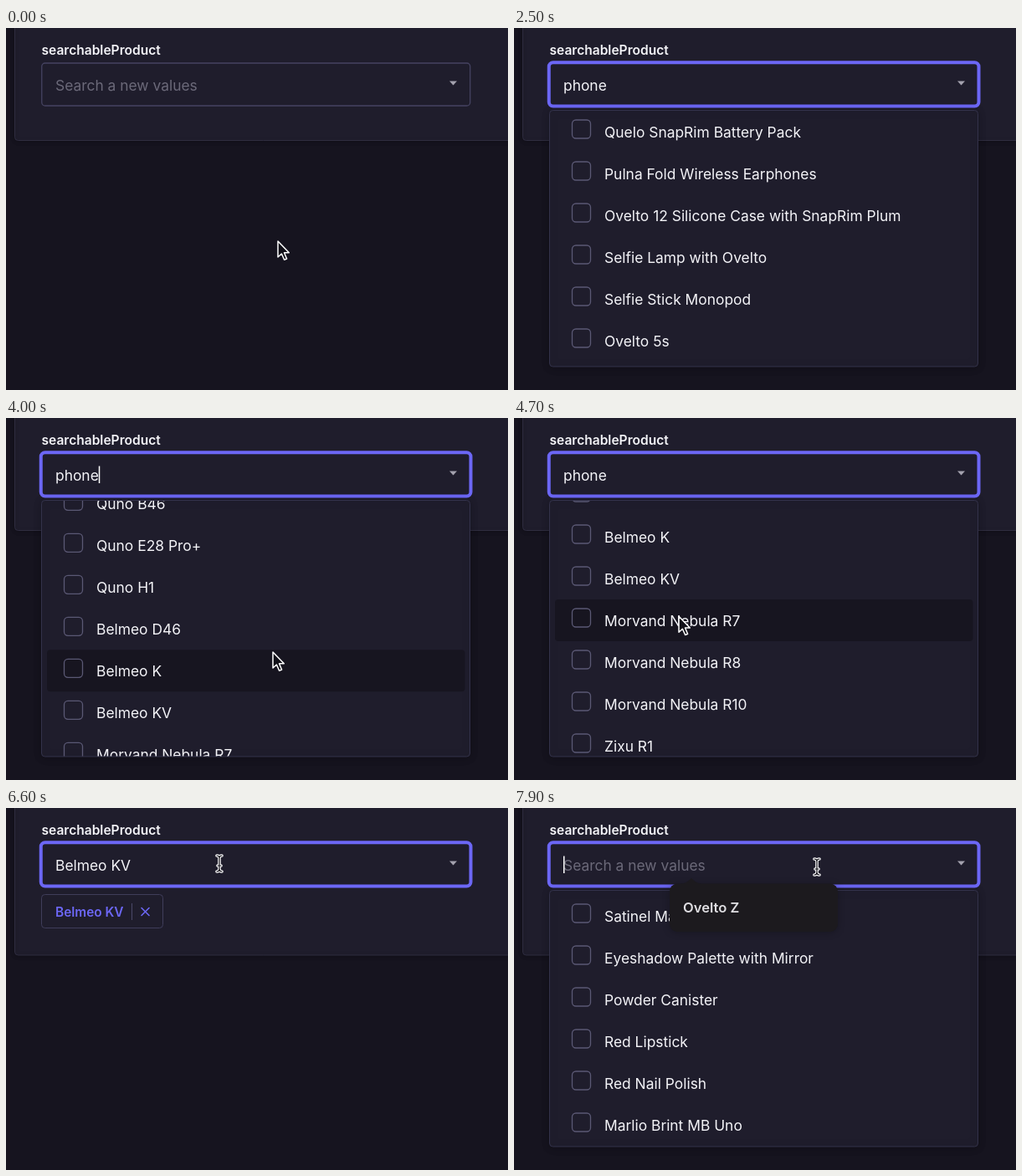
Recreate the animation shown at these times as an HTML page with a canvas. Size 600x433 px, loop 8 s.

```html
<!DOCTYPE html>
<html lang="en">
<head>
<meta charset="utf-8">
<title>Searchable select</title>
<style>
html, body { margin: 0; width: 100%; height: 100%; overflow: hidden; background: #16141f; }
canvas { display: block; }
</style>
</head>
<body>
<canvas id="stage" width="600" height="433"></canvas>
<script>
const ctx = document.getElementById('stage').getContext('2d');
const LOOP = 8000, ROW = 50;
const PURPLE = '#6c67f6', PANEL = '#1f1d2c', WHITE = '#f4f4f8';
const CHOICE = 'Belmeo KV';

const allItems = [
  'Satinel Mascara Lash Duchess', 'Eyeshadow Palette with Mirror', 'Powder Canister',
  'Red Lipstick', 'Red Nail Polish', 'Marlio Brint MB Uno',
  'Orvane Luma Soir Eau De', "Ruvi L'azure"
];
const phoneItems = [
  'Quelo SnapRim Battery Pack', 'Pulna Fold Wireless Earphones',
  'Ovelto 12 Silicone Case with SnapRim Plum', 'Selfie Lamp with Ovelto',
  'Selfie Stick Monopod', 'Ovelto 5s', 'Ovelto 6', 'Ovelto 13 Pro', 'Ovelto Z',
  'Quno B46', 'Quno E28 Pro+', 'Quno H1', 'Belmeo D46', 'Belmeo K', CHOICE,
  'Morvand Nebula R7', 'Morvand Nebula R8', 'Morvand Nebula R10',
  'Zixu R1', 'Zixu W9', 'Zixu Y21'
];

// Keyframes: time, then values
const pointerKeys = [
  [0, 324, 254], [100, 324, 254], [500, 300, 66], [3000, 300, 66], [3400, 318, 279],
  [4500, 318, 279], [5200, 70, 192], [5900, 70, 192], [6500, 255, 65],
  [6900, 255, 65], [7400, 362, 69], [LOOP, 362, 69]
];
const scrollKeys = [[0, 5], [3550, 5], [4000, 476], [4500, 637], [LOOP, 637]];
const keyTimes = [1200, 1500, 1700, 1900, 2100];

function track(keys, t) {
  const i = Math.max(1, keys.findIndex(k => k[0] > t));
  const a = keys[i - 1], b = keys[i];
  const p = (t - a[0]) / (b[0] - a[0]), e = p * (2 - p);
  return a.slice(1).map((v, n) => v + (b[n + 1] - v) * e);
}

function box(x, y, w, h, r, fill, stroke, line = 1) {
  ctx.beginPath();
  ctx.roundRect(x, y, w, h, r);
  if (fill) { ctx.fillStyle = fill; ctx.fill(); }
  if (stroke) { ctx.strokeStyle = stroke; ctx.lineWidth = line; ctx.stroke(); }
}

function shadowBox(blur, ...args) {
  ctx.save();
  ctx.shadowColor = 'rgba(0,0,0,.25)';
  ctx.shadowBlur = blur;
  ctx.shadowOffsetY = 1;
  box(...args);
  ctx.restore();
}

function text(s, x, y, color = WHITE, size = 17.4, weight = 400) {
  ctx.font = `${weight} ${size}px Inter, "Open Sans", sans-serif`;
  ctx.fillStyle = color;
  ctx.fillText(s, x, y);
  return ctx.measureText(s).width;
}

function shape(d, x, y, fill, stroke, line) {
  const path = new Path2D(d);
  ctx.save();
  ctx.translate(x, y);
  ctx.lineJoin = ctx.lineCap = 'round';
  ctx.strokeStyle = stroke;
  ctx.lineWidth = line;
  if (fill) { ctx.fillStyle = fill; ctx.fill(path); }
  ctx.stroke(path);
  ctx.restore();
}

const pointers = {
  arrow(x, y) {
    shape('M1 1V20L5.4 16L8.6 23.3L11.6 22L8.5 14.8H14.3Z', x, y, '#111018', '#fff', 1.5);
  },
  hand(x, y) {
    shape('M0 1Q2-2 4 2L5.5 6.5Q7.5 4.5 9 6.5Q11 5.5 12 7.5Q14.5 7.5 14.3 11L13.5 15L12.5 19H4.5L-2.5 12Q-3 8.5 1.5 10.5L2.5 11Z',
      x, y, '#fff', '#111018', 1);
    shape('M6 12V16M8.3 12V16M10.6 12V16', x, y, null, '#111018', 1);
  },
  beam(x, y) {
    const d = 'M-3-9Q0-9 0-6V7Q0 10-3 10M3-9Q0-9 0-6M0 7Q0 10 3 10M-2 3H2';
    shape(d, x, y + 1, null, '#fff', 3.6);
    shape(d, x, y + 1, null, '#111018', 1.2);
  }
};

function pointerKind(t) {
  if (t < 400) return 'arrow';
  if (t < 1000) return 'beam';
  if (t < 3200) return null;
  if (t < 5100) return 'arrow';
  if (t < 6000) return 'hand';
  return t < 6350 ? 'arrow' : 'beam';
}

function drawList(t, kind, py) {
  const found = t >= 2300 && t < 7000;
  const items = found ? phoneItems : allItems;
  const scroll = found ? track(scrollKeys, t)[0] : t >= 1200 && t < 2300 ? 105 : 0;

  shadowBox(10, 42.5, 98.5, 512, 306.5, 4, PANEL, '#33324a');
  ctx.save();
  ctx.beginPath();
  ctx.rect(43, 99, 511, 305.5);
  ctx.clip();
  items.forEach((name, i) => {
    const y = 129 + i * ROW - scroll;
    if (y < 60 || y > 440) return;
    const active = !found && scroll > 0 && i === 2;
    const hover = kind && py > 99 && py >= y - 25 && py < y + 25;
    if (active || hover) box(49, y - 25, 499.5, ROW, 4, '#171520');
    box(69.5, y - 14, 22, 22, 4.5, null, '#5a5874', 1.3);
    text(name, 108, y + 7, active ? PURPLE : WHITE, 17.4, active ? 700 : 400);
  });
  ctx.restore();
}

function drawInput(t) {
  const focus = t >= 500 && t < 5500 || t >= 6350;
  const typed = keyTimes.filter(k => t >= k).length;
  const value = t >= 7200 ? '' : t >= 5850 ? CHOICE : 'phone'.slice(0, typed);

  if (focus) box(41.75, 41.25, 513.75, 52.25, 5, PANEL, PURPLE, 4);
  else box(42.75, 42, 512, 51, 4, PANEL, t >= 5500 ? '#544da6' : '#454361', 1.3);

  const w = text(value || 'Search a new values', 59, 75, value ? WHITE : '#6b6979');
  const solid = t >= 1200 && t < 2300 || t >= 7500;
  if (focus && (solid || t % 1000 < 500)) {
    ctx.fillStyle = '#fff';
    ctx.fillRect(59 + (value ? w : 0), 57.5, 1.5, 20.5);
  }
  ctx.fillStyle = '#a3a1ae';
  ctx.beginPath();
  ctx.moveTo(530, 63.5);
  ctx.lineTo(539, 63.5);
  ctx.lineTo(534.5, 68.5);
  ctx.fill();
}

function drawTag() {
  box(42.5, 103.5, 145, 40, 4, PANEL, '#3f3d5a');
  text(CHOICE, 59, 130, PURPLE, 15.4, 600);
  ctx.fillStyle = '#4a4868';
  ctx.fillRect(150, 114, 1, 20);
  shape('M-4.5-4.5L4.5 4.5M4.5-4.5L-4.5 4.5', 166.5, 124, null, PURPLE, 1.6);
}

function drawHint() {
  const fill = '#1c1a1e';
  shadowBox(8, 186, 90.5, 201, 57.5, 9, fill);
  ctx.fillStyle = fill;
  ctx.beginPath();
  ctx.moveTo(200, 91);
  ctx.quadraticCurveTo(206, 90, 212, 84);
  ctx.quadraticCurveTo(218, 90, 224, 91);
  ctx.fill();
  text('Ovelto Z', 202, 124.5, '#dfdee2', 16.6, 600);
}

function draw(t) {
  const chosen = t >= 5850;
  const open = t >= 600 && t < 5850 || t >= 7600;
  const kind = pointerKind(t);
  const [px, py] = track(pointerKeys, t);

  ctx.fillStyle = '#16141f';
  ctx.fillRect(0, 0, 600, 433);
  shadowBox(5, 10.5, -20, 620, chosen ? 196 : 154.5, 4, PANEL, '#2f2d40');
  text('searchableProduct', 42.5, 32.2, WHITE, 15.55, 600);
  drawInput(t);
  if (chosen) drawTag();
  if (open) drawList(t, kind, py);
  if (t >= 7800) drawHint();
  if (kind) pointers[kind](px, py);
}

function tick() {
  draw(performance.now() % LOOP);
  requestAnimationFrame(tick);
}
tick();
</script>
</body>
</html>
```
